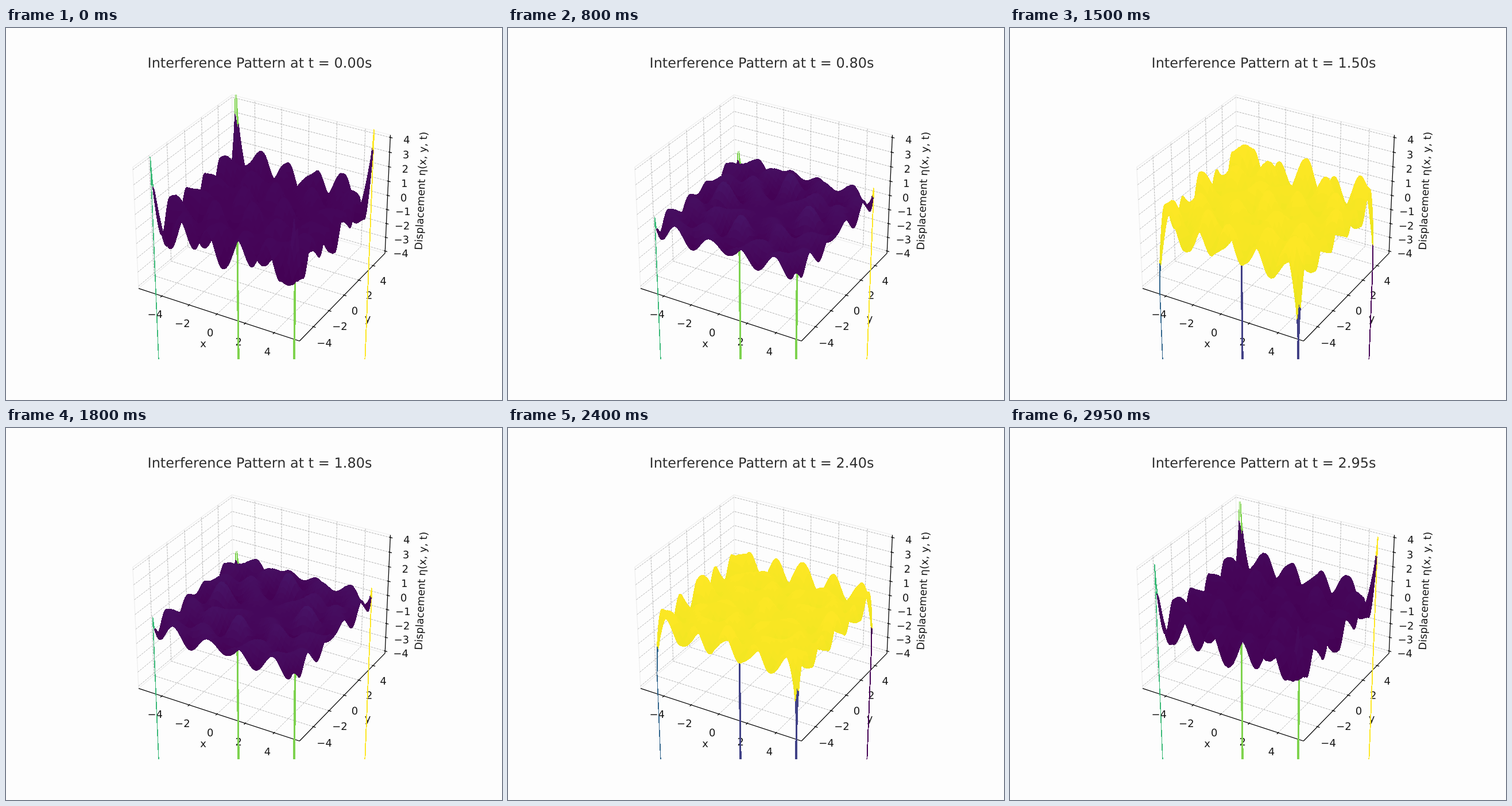
Animation, 864 px wide and 648 px high, one loop 3 s. Source, as an HTML page with a canvas:

```html
<!DOCTYPE html>
<html lang="en">
<head>
<meta charset="utf-8">
<title>Interference Pattern</title>
<style>
  html, body { margin: 0; width: 100%; height: 100%; overflow: hidden; background: #fdfdfd; }
  svg, canvas { position: absolute; left: 0; top: 0; width: 864px; height: 648px; }
  text {
    font: 18px "DejaVu Sans", sans-serif; fill: #151515;
    text-anchor: middle; text-rendering: geometricPrecision;
  }
  #title { font-size: 24px; fill: #2e2e2e; }
  .grid { fill: none; stroke: #b0b0b0; stroke-width: 0.95; stroke-dasharray: 3.5 1.5; }
  .pane { fill: none; stroke: #f0f0f0; stroke-width: 1.5; }
  .axis { fill: none; stroke: #000; stroke-width: 1.25; }
</style>
</head>
<body>
<svg id="plot" viewBox="0 0 864 648"></svg>
<canvas id="surface" width="864" height="648"></canvas>
<script>
const W = 864, H = 648, TOP = 78, BOTTOM = 577;
const FRAME_MS = 50, FRAMES = 60;

// Perspective view of the plot box: elevation 30, azimuth -60, eye distance 10
const XY = 0.59524, ZH = 0.44643;           // half sizes of the box
const XY_LIM = 5.7292, Z_LIM = 4.1667;      // data limits
const SCALE = 498.96 / 0.185, CX = 449.54, CY = 320.5;
const S3 = Math.sqrt(3) / 2;

function project(x, y, z) {
  const depth = 10 - (S3 * 0.5 * x - 0.75 * y + 0.5 * z);
  const u = S3 * x + 0.5 * y;
  const v = -0.25 * x + S3 * 0.5 * y + S3 * z;
  return [CX + SCALE * u / depth, CY - SCALE * v / depth, -10 / depth];
}
const toXY = v => v / XY_LIM * XY;
const toZ = v => v / Z_LIM * ZH;

// ---------- static axes ----------
const svg = document.getElementById('plot');

function add(tag, attrs, text) {
  const el = document.createElementNS('http://www.w3.org/2000/svg', tag);
  for (const k in attrs) el.setAttribute(k, attrs[k]);
  if (text) el.textContent = text;
  svg.appendChild(el);
  return el;
}
function line(cls, ...pts) {
  const points = pts.map(p => project(...p).slice(0, 2).map(n => n.toFixed(2)).join()).join(' ');
  add('polyline', { class: cls, points });
}
function tickLabel(value, at) {
  const [x, y] = project(...at);
  add('text', { x: x - 0.3, y: Math.round(y + 14) }, String(value).replace('-', '\u2212'));
}

const A = XY, C = ZH;
const PAD = 0.08, PAD_Z = 0.06;             // label distance from the box
const OUT = 0.016, IN = 0.008;              // tick lengths
const even = [-4, -2, 0, 2, 4];
const all = [-4, -3, -2, -1, 0, 1, 2, 3, 4];

line('pane', [-A, -A, -C], [-A, A, -C], [-A, A, C], [-A, -A, C], [-A, -A, -C]);
line('pane', [-A, A, -C], [A, A, -C], [A, A, C], [-A, A, C]);
line('pane', [-A, -A, -C], [A, -A, -C], [A, A, -C]);

for (const t of even) {
  const p = toXY(t);
  line('grid', [p, -A, -C], [p, A, -C], [p, A, C]);
  line('grid', [A, p, -C], [-A, p, -C], [-A, p, C]);
}
for (const t of all) line('grid', [-A, -A, toZ(t)], [-A, A, toZ(t)], [A, A, toZ(t)]);

line('axis', [-A, -A, -C], [A, -A, -C]);
line('axis', [A, -A, -C], [A, A, -C]);
line('axis', [A, A, -C], [A, A, C]);

for (const t of even) {
  const p = toXY(t);
  line('axis', [p, -A - OUT, -C], [p, -A + IN, -C]);
  line('axis', [A + OUT, p, -C], [A - IN, p, -C]);
  tickLabel(t, [p, -A - PAD, -C - PAD_Z]);
  tickLabel(t, [A + PAD, p, -C - PAD_Z]);
}
for (const t of all) {
  const p = toZ(t);
  line('axis', [A + OUT, A, p], [A - IN, A, p]);
  tickLabel(t, [A + PAD, A + PAD, p]);
}
add('text', { x: 343.5, y: 556 }, 'x');
add('text', { x: 630, y: 512 }, 'y');
add('text', { transform: 'translate(729.2 284) rotate(-87.5)' }, 'Displacement \u03b7(x, y, t)');
const title = add('text', { id: 'title', x: 442, y: 69 }, ' ');

// ---------- colour map ----------
const stops = ('440154 48186a 472d7b 424086 3b528b 33638d 2c728e 26828e 21918c 1fa088 ' +
  '28ae80 3fbc73 5ec962 84d44b addc30 d8e219 fde725').split(' ')
  .map(h => [0, 2, 4].map(i => parseInt(h.substr(i, 2), 16)));

const palette = Uint32Array.from({ length: 256 }, (_, i) => {
  const k = Math.min(15, i >> 4);
  const f = (i - k * 16) / (k === 15 ? 15 : 16);
  const [r, g, b] = stops[k].map((c, n) => Math.round(c + (stops[k + 1][n] - c) * f));
  return (255 << 24 | b << 16 | g << 8 | r) >>> 0;
});

// ---------- wave field: one source in each corner ----------
const N = 150, STEP = 3, K = Math.PI, OMEGA = 2 * Math.PI;
const sources = [[-5, -5], [5, -5], [-5, 5], [5, 5]];
const coord = i => -5 + 10 * i / (N - 1);

// eta = re * cos(wt) + im * sin(wt)
const re = new Float64Array(N * N), im = new Float64Array(N * N);
for (let i = 0; i < N; i++) for (let j = 0; j < N; j++) {
  for (const [sx, sy] of sources) {
    const r = Math.hypot(coord(j) - sx, coord(i) - sy);
    const amp = 1 / Math.sqrt(r + 1e-6);
    re[i * N + j] += amp * Math.cos(K * r);
    im[i * N + j] += amp * Math.sin(K * r);
  }
}

// Each face is the outline of a patch of up to STEP x STEP cells
const cuts = [];
for (let i = 0; i < N - 1; i += STEP) cuts.push(i);
cuts.push(N - 1);

const faces = [];
for (let a = 0; a + 1 < cuts.length; a++) for (let b = 0; b + 1 < cuts.length; b++) {
  const [i0, i1, j0, j1] = [cuts[a], cuts[a + 1], cuts[b], cuts[b + 1]];
  const ring = [];
  for (let j = j0; j < j1; j++) ring.push(i0 * N + j);
  for (let i = i0; i < i1; i++) ring.push(i * N + j1);
  for (let j = j1; j > j0; j--) ring.push(i1 * N + j);
  for (let i = i1; i > i0; i--) ring.push(i * N + j0);
  faces.push({ ring, mean: 0, depth: 0 });
}

// ---------- drawing ----------
const ctx = document.getElementById('surface').getContext('2d');
const image = ctx.createImageData(W, H);
const pixels = new Uint32Array(image.data.buffer);
const px = new Float64Array(N * N), py = new Float64Array(N * N);
const eta = new Float64Array(N * N), key = new Float64Array(N * N);

function span(row, from, to, color) {
  from = Math.max(0, from);
  to = Math.min(W, to);
  if (to > from) pixels.fill(color, row * W + from, row * W + to);
}

// Paints every pixel that the edge p-q passes through
function traceEdge(p, q, color) {
  if (py[p] > py[q]) [p, q] = [q, p];
  const y0 = py[p], y1 = py[q];
  const slope = y1 > y0 ? (px[q] - px[p]) / (y1 - y0) : 0;
  const first = Math.max(TOP, Math.floor(y0));
  const last = Math.min(BOTTOM - 1, Math.floor(y1));
  for (let row = first; row <= last; row++) {
    const xa = row <= y0 ? px[p] : px[p] + (row - y0) * slope;
    const xb = row + 1 >= y1 ? px[q] : px[p] + (row + 1 - y0) * slope;
    span(row, Math.floor(Math.min(xa, xb)), Math.floor(Math.max(xa, xb)) + 1, color);
  }
}

// Hard-edged polygon: the inside plus every pixel touched by the outline
function fill(ring, color) {
  let lo = Infinity, hi = -Infinity;
  let p = ring[ring.length - 1];
  for (const q of ring) {
    lo = Math.min(lo, py[q]);
    hi = Math.max(hi, py[q]);
    traceEdge(p, q, color);
    p = q;
  }
  const first = Math.max(TOP, Math.ceil(lo - 0.5));
  const last = Math.min(BOTTOM - 1, Math.floor(hi - 0.5));
  for (let row = first; row <= last; row++) {
    const yc = row + 0.5, xs = [];
    for (const q of ring) {
      if ((py[p] <= yc) !== (py[q] <= yc)) {
        xs.push(px[p] + (yc - py[p]) / (py[q] - py[p]) * (px[q] - px[p]));
      }
      p = q;
    }
    xs.sort((m, n) => m - n);
    for (let k = 0; k + 1 < xs.length; k += 2) {
      span(row, Math.floor(xs[k]), Math.floor(xs[k + 1]) + 1, color);
    }
  }
}

function draw(frame) {
  const t = frame * FRAME_MS / 1000;
  const c = Math.cos(OMEGA * t), s = Math.sin(OMEGA * t);
  title.textContent = `Interference Pattern at t = ${t.toFixed(2)}s`;

  for (let n = 0; n < N * N; n++) {
    eta[n] = re[n] * c + im[n] * s;
    const p = project(toXY(coord(n % N)), toXY(coord(Math.floor(n / N))), toZ(eta[n]));
    px[n] = p[0];
    py[n] = p[1];
    key[n] = p[2];
  }

  let min = Infinity, max = -Infinity;
  for (const f of faces) {
    let z = 0, d = 0;
    for (const p of f.ring) { z += eta[p]; d += key[p]; }
    f.mean = z / f.ring.length;
    f.depth = d / f.ring.length;
    min = Math.min(min, f.mean);
    max = Math.max(max, f.mean);
  }

  pixels.fill(0);
  for (const f of [...faces].sort((a, b) => b.depth - a.depth)) {
    const level = Math.floor((f.mean - min) / (max - min) * 256);
    fill(f.ring, palette[Math.min(255, level)]);
  }
  ctx.putImageData(image, 0, 0);
}

const start = performance.now();
let shown = -1;
function tick() {
  const frame = Math.floor((performance.now() - start) / FRAME_MS) % FRAMES;
  if (frame !== shown) draw(shown = frame);
  requestAnimationFrame(tick);
}
tick();
</script>
</body>
</html>
```
